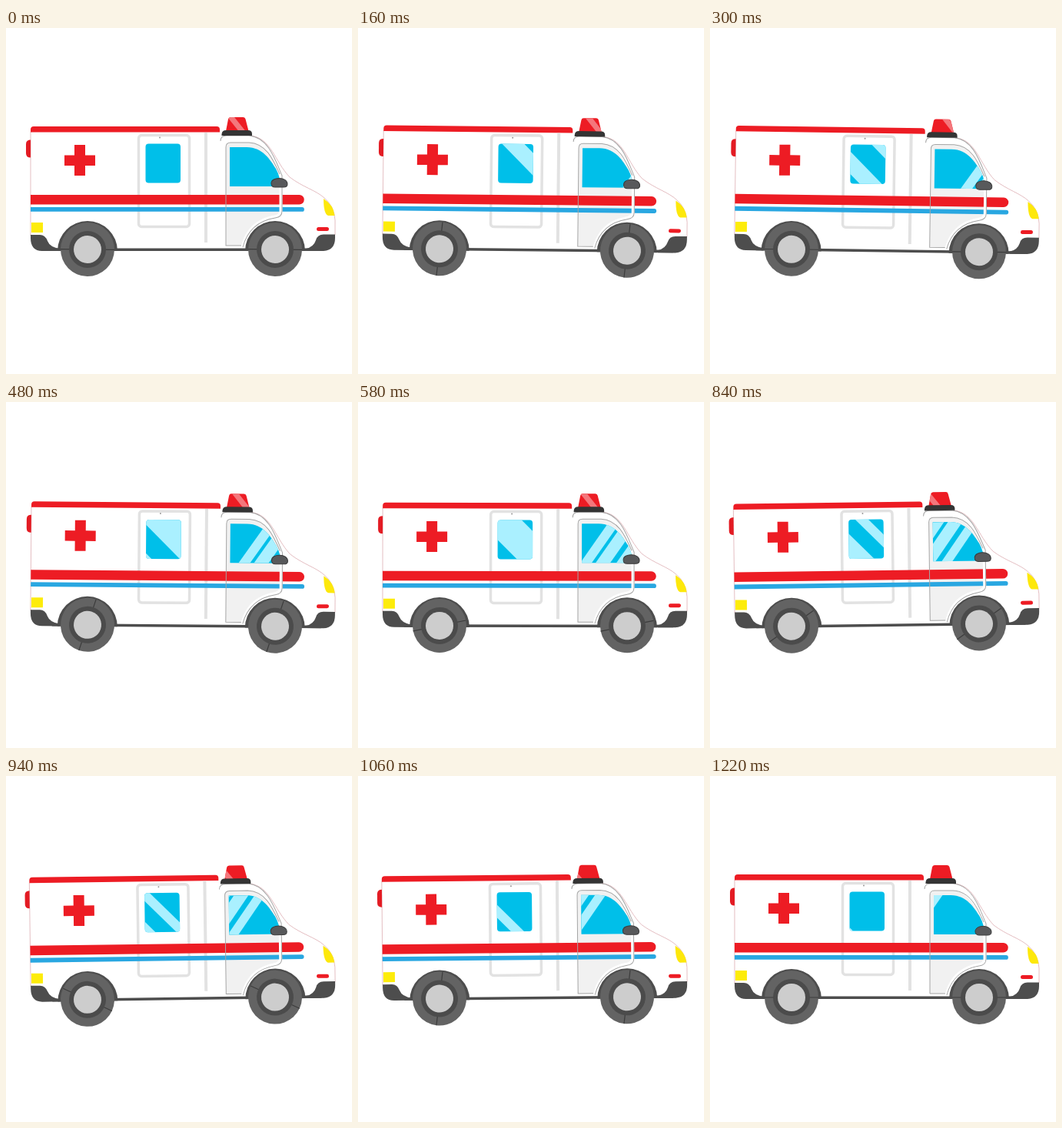
These frames come from a looping animation (450x450 px, 1240 ms). An HTML page:

```html
<!DOCTYPE html>
<html lang="en">
<head>
<meta charset="utf-8">
<title>Ambulance</title>
<style>
  html, body { margin: 0; width: 100%; height: 100%; overflow: hidden; background: #fff; }
  svg { display: block; width: 100%; height: 100%; }
</style>
</head>
<body>
<svg viewBox="0 0 450 450">
  <defs>
    <clipPath id="sideClip"><rect x="181.500" y="150.500" width="45.500" height="51" rx="4"/></clipPath>
    <clipPath id="cabClip"><path id="cabGlass" d="M291 155H313C334 155 344 172 351 183Q357 194 357 206H291Z"/></clipPath>
    <clipPath id="beaconClip"><path id="lamp" d="M286 134L289 118.500Q289.500 116 292 116H308.500Q311 116 311.500 118.500L315.500 134Z"/></clipPath>
    <g id="wheel">
      <circle r="35" fill="#636363"/>
      <path d="M-35 0H35" stroke="#3c3c3c" stroke-width="1.200"/>
      <circle r="24" fill="#4b4b4b"/>
      <circle r="18" fill="#cdcdcd"/>
    </g>
  </defs>

  <g id="body">
    <path d="M32 135V270M318 140C345 143 349 173 369 194C386 207 403 211 414 221Q427 232 428 250V269" fill="none" stroke="#d9a3a8" stroke-width=".7"/>
    <path d="M32 145.500Q26 145.500 26 151V163Q26 168.500 32 168.500Z" fill="#e31b23"/>
    <path d="M32 135.500V132Q32 128 36 128H274Q278 128 278 132V135.500Z" fill="#ed1c24"/>
    <path d="M89 152H103V165.500H116V179H103V192H89V179H76V165.500H89Z" fill="#ed1c24"/>

    <g fill="none" stroke="#e2e2e2">
      <rect x="172.500" y="139.500" width="66" height="119" rx="4" stroke-width="3.500"/>
      <path d="M260 136V279" stroke-width="4"/>
    </g>
    <circle cx="200" cy="142.500" r="1" fill="#999"/>

    <path d="M286 155Q286 149 292 149H316C338 150 350 178 356 195V236Q356 243 347 244C323 249 311 264 306 283H286Z" fill="#f1f1f1"/>
    <path d="M32 217H381.500A6 6 0 0 1 381.500 229.500H32Z" fill="#ed1c24"/>
    <path d="M32 233H385A2.900 2.900 0 0 1 385 238.800H32Z" fill="#29a7e1"/>
    <path d="M357.500 195V240" stroke="#fff" stroke-width="4"/>
    <g fill="none" stroke="#a5a5a5">
      <path d="M279 147Q279 140 287 140H316C342 142 351 174 359 192V238Q359 246 350 247C326 251 313 266 308 285"/>
      <path d="M356 190C347 170 338 150 316 149H292Q286 149 286 155V283H306"/>
    </g>

    <rect x="181.500" y="150.500" width="45.500" height="51" rx="4" fill="#00bfe9"/>
    <g id="sideShine" clip-path="url(#sideClip)" fill="#aaf0ff"></g>
    <use href="#cabGlass" fill="#00bfe9"/>
    <g id="cabShine" clip-path="url(#cabClip)" fill="#aaf0ff"></g>

    <path d="M345 202C345 193 366 193 366 203Q366 207 361 207H350Q345 207 345 202Z" fill="#58595b" stroke="#3b3b3b"/>

    <use href="#lamp" fill="#ed1c24"/>
    <g id="beaconShine" clip-path="url(#beaconClip)" fill="#f4777c"></g>
    <path d="M280.500 140V138Q281 133 286 133H315Q320 133 320 138V140Z" fill="#343434"/>

    <path d="M413 222Q426 230 427.500 244H419Q413 242 413 222Z" fill="#fde80b"/>
    <rect x="404" y="259" width="16" height="5" rx="2.500" fill="#ed1c24"/>
    <rect x="33" y="253" width="15" height="13" fill="#fdec0b"/>
    <g fill="#4d4d4d">
      <path d="M60 286.500H410V290H60Z"/>
      <path d="M32 269H44Q51 269 54 277Q57 285 70 287V290H47Q32 290 32 273Z"/>
      <path d="M428 268.500H413Q405 268.500 403 276Q400 285 390 287V290H413Q428 289 428 273Z"/>
      <path d="M67 290A39 39 0 0 1 145 290ZM311 290A39 39 0 0 1 389 290Z"/>
    </g>
  </g>
  <use id="rear" href="#wheel"/>
  <use id="front" href="#wheel"/>
</svg>
<script>
  const LOOP = 1240, MOVE = 1200; // the van rests between MOVE and LOOP
  const PIVOT = 230;
  const get = id => document.getElementById(id);
  const setTransform = (id, value) => get(id).setAttribute('transform', value);

  // Slanted bands given as [left, right] along the top edge
  function addBands(id, bands, top, bottom, slope) {
    const lean = (bottom - top) * slope;
    get(id).innerHTML = '<g>' + bands.map(([a, b]) =>
      `<path d="M${a} ${top}H${b}L${b + lean} ${bottom}H${a + lean}Z"/>`).join('') + '</g>';
  }
  const slide = (id, x) => get(id).firstChild.setAttribute('transform', `translate(${x})`);

  addBands('sideShine', [[40, 69], [106, 163], [190, 207]], 150, 202, 1);
  addBands('cabShine', [[291, 306], [311, 330], [338, 352]], 155, 207, -.7);
  addBands('beaconShine', [[0, 9]], 116, 134, .8);

  function draw(t) {
    const progress = Math.min(t / MOVE, 1);
    const phase = 2 * Math.PI * progress;
    const tilt = .78 * Math.sin(phase);
    const drop = 1.55 * (1 - Math.cos(phase));

    setTransform('body', `translate(0 ${drop}) rotate(${tilt} ${PIVOT} 260)`);
    for (const [id, x] of [['rear', 106], ['front', 350]]) {
      const lift = (x - PIVOT) * tilt * Math.PI / 180;
      setTransform(id, `translate(${x} ${288 + drop + lift}) rotate(${720 * progress})`);
    }

    slide('sideShine', .19 * (840 - t) + .12 * Math.max(0, 300 - t));
    slide('cabShine', .13 * (840 - t));
    slide('beaconShine', 300 - .04 * Math.abs(t - 300));
  }

  const start = performance.now();
  function tick() {
    draw((performance.now() - start) % LOOP);
    requestAnimationFrame(tick);
  }
  tick();
</script>
</body>
</html>
```
